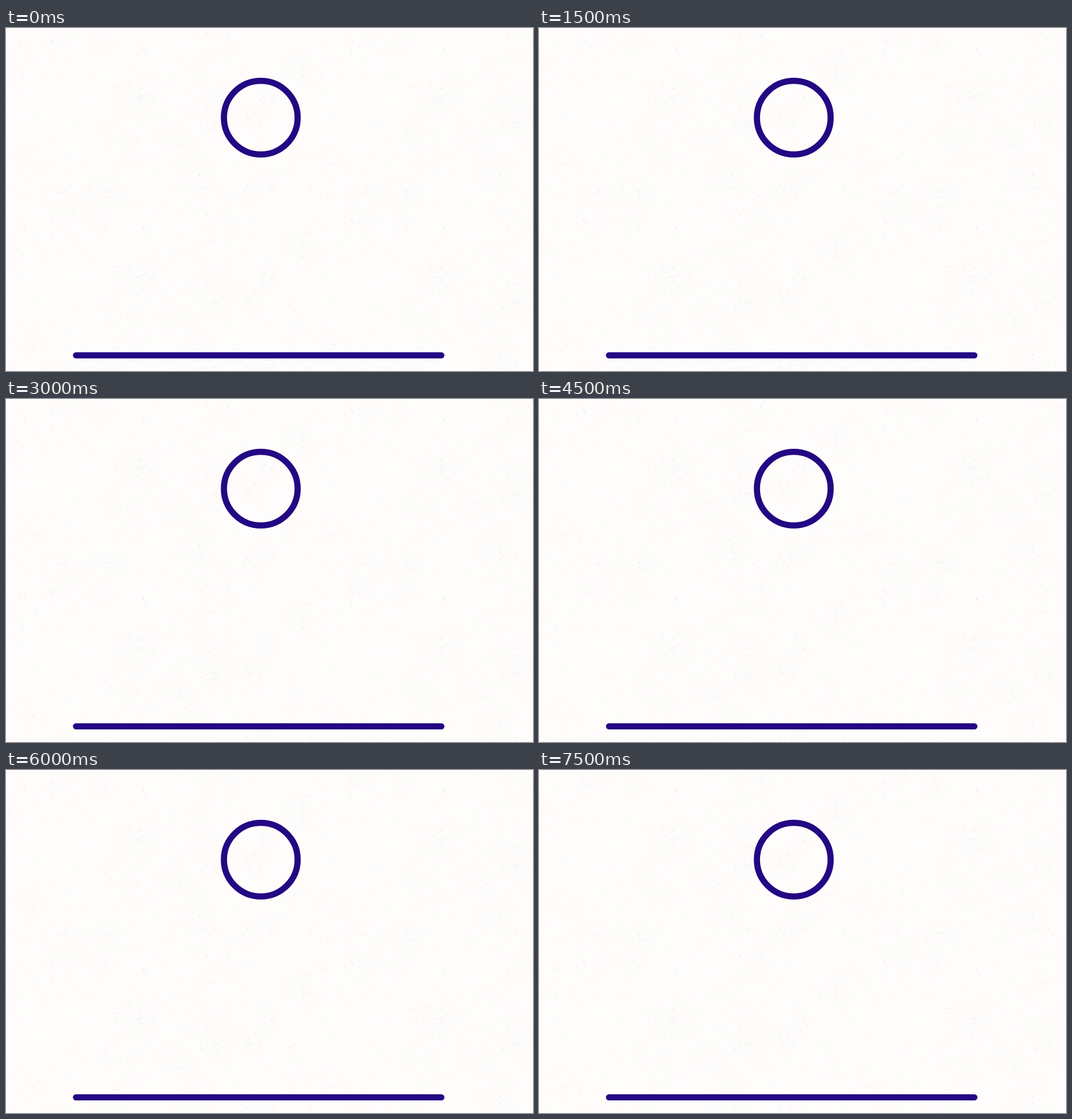
Recreate the animation shown at these times as an HTML page with a canvas. Size 877 px wide and 572 px high, loop 8000 ms.

```html
<!DOCTYPE html>
<html lang="en">
<head>
<meta charset="utf-8">
<title>Squash and stretch</title>
<style>
  html, body { margin: 0; width: 100%; height: 100%; overflow: hidden; background: #fefdfc; }
  canvas, svg { position: absolute; left: 0; top: 0; display: block; }
  .ink { fill: none; stroke: #240783; stroke-width: 10.3; stroke-linecap: round; stroke-linejoin: round; }
  text { font: bold 29px Roboto, Arial, sans-serif; letter-spacing: .8px; fill: #240783; }
</style>
</head>
<body>
<canvas id="paper" width="877" height="572"></canvas>
<svg width="877" height="572" viewBox="0 0 877 572">
  <path class="ink" d="M116.5 545.8H724.5"/>
  <g id="ball"><circle class="ink" r="61.35"/></g>
  <g id="note">
    <path d="M400 544H414Q432 540 468 540" fill="none" stroke="#8d80bd" stroke-width=".7"/>
    <text x="551" y="391.5">squash</text>
    <path class="ink" d="M550.5 407.5L519 451.5M509 428.5L519 451.5L544 445"/>
  </g>
</svg>
<script>
  const BEAT = 500;
  const BEATS = 16;
  const POSES = {
    top: { x: 424, y: 149.5, sx: 1, sy: 1 },
    stretch: { x: 424, y: 356, sx: 0.72, sy: 1.518 },
    squash: { x: 429.5, y: 504, sx: 1.4, sy: 0.612 }
  };

  // The ball lands on every third beat; only the first fall shows the stretch.
  function poseAt(beat) {
    if (beat % 3 === 2) return 'squash';
    return beat === 1 ? 'stretch' : 'top';
  }

  function seeded(seed) {
    return () => (seed = (seed * 16807) % 2147483647) / 2147483647;
  }

  // One repeat of the worn paper: fine grain, clustered specks and scratches.
  function paperTile(w, h) {
    const tile = document.createElement('canvas');
    tile.width = w;
    tile.height = h;
    const g = tile.getContext('2d');
    const rnd = seeded(77);
    const spread = size => (rnd() + rnd() + rnd() - 1.5) * size;
    const grey = a => `rgba(90,90,85,${a})`;
    const speck = (x, y, size, a) => {
      g.fillStyle = grey(a);
      g.fillRect((x + w) % w, (y + h) % h, size, size);
    };
    const scratch = (x, y, dx, dy, a) => {
      g.strokeStyle = grey(a);
      g.lineWidth = 0.7;
      g.beginPath();
      g.moveTo(x, y);
      g.quadraticCurveTo(x + dx * 0.6, y + dy * 0.4, x + dx, y + dy);
      g.stroke();
    };

    g.fillStyle = '#fefdfc';
    g.fillRect(0, 0, w, h);
    for (let i = 0; i < 2500; i++) speck(rnd() * w, rnd() * h, 1, rnd() * 0.04);
    for (let i = 0; i < 1500; i++) speck(320 + spread(90), rnd() * h, 1, rnd() * 0.05);

    for (let patch = 0; patch < 24; patch++) {
      const x = rnd() * w, y = rnd() * h, size = 20 + rnd() * 25;
      for (let i = 0; i < 120; i++) {
        speck(x + spread(size), y + spread(size), 1 + rnd() * 2, rnd() * 0.03);
      }
    }
    for (let i = 0; i < 90; i++) {
      scratch(rnd() * w, rnd() * h, spread(18), spread(14), 0.03 + rnd() * 0.09);
    }
    for (let i = 0; i < 25; i++) speck(rnd() * w, rnd() * h, 1.3, 0.1 + rnd() * 0.2);
    return tile;
  }

  const paper = document.getElementById('paper').getContext('2d');
  paper.fillStyle = paper.createPattern(paperTile(500, 300), 'repeat');
  paper.fillRect(0, 0, 877, 572);

  const ball = document.getElementById('ball');
  const note = document.getElementById('note');
  const start = performance.now();

  function draw() {
    const beat = Math.floor((performance.now() - start) / BEAT) % BEATS;
    const pose = poseAt(beat);
    const { x, y, sx, sy } = POSES[pose];
    ball.setAttribute('transform', `translate(${x} ${y}) scale(${sx} ${sy})`);
    note.setAttribute('visibility', pose === 'squash' ? 'visible' : 'hidden');
    requestAnimationFrame(draw);
  }
  draw();
</script>
</body>
</html>
```
